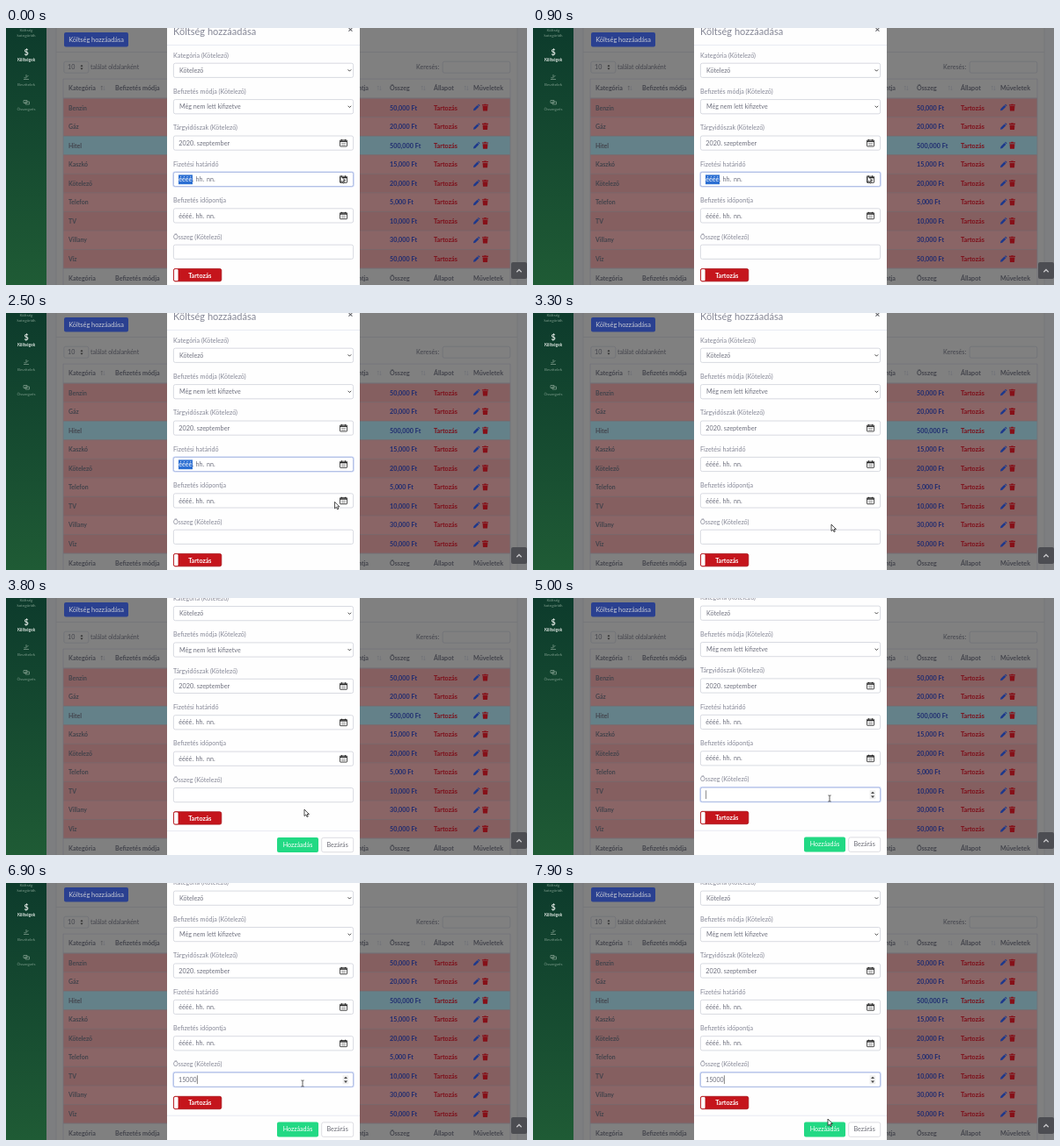
Recreate the animation shown at these times as an HTML page. Size 592 px wide and 293 px high, loop 8000 ms.

```html
<!DOCTYPE html>
<html lang="hu">
<head>
<meta charset="utf-8">
<style>
html, body { margin: 0; width: 100%; height: 100%; overflow: hidden; background: #7d7e80; }
svg { display: block; width: 592px; height: 293px; font-family: Lato, "Open Sans", sans-serif; }
text { white-space: pre; }
</style>
</head>
<body>
<svg id="stage" viewBox="0 0 592 293">
  <defs>
    <linearGradient id="side" x2="0" y2="1">
      <stop stop-color="#0d3b2c"/><stop offset="1" stop-color="#1f5b35"/>
    </linearGradient>
  </defs>
  <g id="page"></g>
  <rect x="183" y="-5" width="219" height="303" fill="#fefefe"/>
  <g id="modal"></g>
  <path id="arrow" d="M0 0V7.6L1.8 6L3 8.6L4.3 8L3.1 5.5H5.4Z" fill="#fff" stroke="#222" stroke-width=".8"/>
  <path id="beam" d="M-1.6-3.5H-.4L0-3L.4-3.5H1.6M0-3V3M-1.6 3.5H-.4L0 3L.4 3.5H1.6" fill="none" stroke="#333" stroke-width=".8"/>
</svg>
<script>
const $ = id => document.getElementById(id);
const text = (x, y, s, fill, size = 7.15, extra = '') =>
  `<text x="${x}" y="${y}" fill="${fill}" font-size="${size}" ${extra}>${s}</text>`;
const bold = (x, y, s, fill, size = 7.15) => text(x, y, s, fill, size, 'font-weight="700"');
const mid = (x, y, s, fill, size, weight = 400) =>
  text(x, y, s, fill, size, `text-anchor="middle" font-weight="${weight}"`);
const rect = (x, y, w, h, fill, stroke = 'none', r = 0, extra = '') =>
  `<rect x="${x}" y="${y}" width="${w}" height="${h}" fill="${fill}" stroke="${stroke}" stroke-width=".8" rx="${r}" ${extra}/>`;
const line = (d, stroke, w = 0.8) => `<path d="${d}" fill="none" stroke="${stroke}" stroke-width="${w}"/>`;

function drawPage() {
  const ink = '#42434b', edge = '#707178', dim = '#7b9a8a', lit = '#dde5e0';
  let s = rect(57, -5, 524, 305, '#808080', '#747579') + line('M57 27.5H581', '#747579');

  s += rect(0, 0, 46, 293, 'url(#side)');
  s += mid(23, 4, 'Költség', dim, 4.6) + mid(23, 10, 'kategóriák', dim, 4.6);
  s += mid(23, 31, '$', lit, 9, 700) + mid(23, 38.2, 'Költségek', lit, 4.6, 700);
  s += line('M20 58.5H26M20.5 56.5L22.5 57L25.5 54M23 53V56', dim) + mid(23, 66, 'Bevételek', dim, 4.6);
  s += line('M20 82.5H24V85.5H20ZM22 84H26.5V87H22Z', dim) + mid(23, 93.5, 'Összegzés', dim, 4.6);

  s += rect(66, 5, 73, 16.5, '#2a4090', 'none', 2) + mid(102.5, 15.7, 'Költség hozzáadása', '#c9cbd3', 7.35);
  s += rect(65.8, 38.2, 28, 13, '#808080', edge, 2) + text(70, 47.4, '10', ink);
  s += '<path d="M84.5 44L86 41.8L87.5 44ZM84.5 45.6L86 47.8L87.5 45.6Z" fill="#333"/>';
  s += text(96, 47, 'találat oldalanként', ink, 6.9) + text(466, 47, 'Keresés:', ink);
  s += rect(496.2, 38.2, 76.6, 13, '#808080', edge, 2);

  const heads = [[71, 'Kategória'], [124, 'Befizetés módja'], [436, 'Összeg'], [486, 'Állapot'], [531, 'Műveletek']];
  for (const y of [71.3, 287.8]) {
    for (const [x, name] of heads) s += bold(x, y, name, ink);
    s += text(412, y, 'Befizetés időpontja', ink, 7.15, 'font-weight="700" text-anchor="end"');
  }
  for (const x of [110, 424, 474, 523])
    s += line(`M${x - 1.2} 71V66M${x - 2.2} 67.2L${x - 1.2} 66L${x - .2} 67.2`, x < 200 ? '#55565c' : '#707177', .6)
       + line(`M${x + 1.5} 66V71M${x + .5} 69.8L${x + 1.5} 71L${x + 2.5} 69.8`, '#707177', .6);

  const rows = [['Benzin', 50], ['Gáz', 20], ['Hitel', 500], ['Kaszkó', 15], ['Kötelező', 20],
    ['Telefon', 5], ['TV', 10], ['Villany', 30], ['Víz', 50]];
  rows.forEach(([name, sum], i) => {
    const top = 80 + i * 21.57, y = top + 13.5;
    s += rect(65, top, 508, 21.57, i == 2 ? '#648189' : i % 2 ? '#8a6566' : '#855f60');
    s += line(`M65 ${top}H573`, '#75656a', .6);
    s += bold(71, y, name, ink, 6.9) + bold(436, y, sum + ',000 Ft', '#1f2c70', 7.25) + bold(486, y, 'Tartozás', '#7d0d18', 7.25);
    s += `<g transform="translate(531 ${top + 7})"><path d="M0 7.3L.5 5L4.6.9L6.4 2.7L2.3 6.8ZM5.1.4L6 -.3L7.6 1.3L6.9 2.2Z" fill="#1d388c"/>
      <path d="M10 .3H12L12.5-.3H14.5L15 .3H17V1.4H10ZM10.6 2H16.4L16 7.5H11Z" fill="#861018"/></g>`;
  });
  s += line('M65 58H573M65 80H573M65 274.1H573M65 58V293M573 58V293', '#727379');
  s += rect(574, 267, 18, 19, '#4c4d52', 'none', 2) + line('M580.3 278.2L583 275.5L585.7 278.2', '#c8c8ca', 1.3);
  $('page').innerHTML = s;
}

const INK = '#6e707e', LABEL = '#858796', STEP = 41.4;
const fieldTop = i => 40.2 + i * STEP;

function field(i, label, focus) {
  const y = fieldTop(i);
  return text(190, y - 6.7, label, LABEL)
    + (focus ? rect(189.3, y - 1, 206.4, 18.2, '#cfd9f7', 'none', 2.4) : '')
    + rect(190.4, y, 204.2, 16.2, '#fff', focus ? '#9fb0de' : '#cfd1da', 2);
}

function choice(i, label, value) {
  const y = fieldTop(i);
  return field(i, label) + text(197, y + 10.7, value, INK)
    + line(`M388.6 ${y + 7.2}L390.4 ${y + 9}L392.2 ${y + 7.2}`, '#444', 1);
}

function calendar(i) {
  const y = fieldTop(i) + 4;
  return `<g transform="translate(379.5 ${y})">` + rect(0, .8, 8, 7.2, '#fff', '#222', .5)
    + line('M0 2.2H8', '#222', 1.4) + line('M2 0V1.5M6 0V1.5', '#222', 1)
    + line('M1.5 4.5H6.5M1.5 6.3H6.5', '#777', .7) + '</g>';
}

function date(i, label, focus) {
  const y = fieldTop(i) + 10.7;
  return field(i, label, focus) + (focus ? rect(196, y - 7.7, 16, 10.8, '#2c6fd3') : '')
    + text(196.3, y, 'éééé', focus ? '#fff' : INK) + text(211.8, y, '.', INK)
    + text(215.5, y, 'hh.', INK) + text(228, y, 'nn.', INK) + calendar(i);
}

const typed = [5800, 6100, 6400, 6600, 6850];
const CLICK = 4700;

function amount(t) {
  const focus = t >= CLICK, n = typed.filter(k => t >= k).length;
  const y = fieldTop(5), last = n ? typed[n - 1] : CLICK, x = 196.6 + n * 4.16;
  let s = field(5, 'Összeg (Kötelező)', focus) + text(196, y + 10.7, '15000'.slice(0, n), INK);
  if (focus) {
    s += rect(382.6, y + 3.2, 6.6, 10, '#eee')
      + `<path d="M384 ${y + 7}L386 ${y + 4.6}L388 ${y + 7}ZM384 ${y + 9.4}L386 ${y + 11.8}L388 ${y + 9.4}Z" fill="#444"/>`;
    if ((t - last) % 1000 < 500) s += line(`M${x} ${y + 3.2}V${y + 13}`, '#555', .7);
  }
  return s;
}

function drawModal(t) {
  let s = text(190, 7.6, 'Költség hozzáadása', LABEL, 11.05) + mid(391.5, 5, '×', '#55565c', 10, 700);
  s += line('M183 19.5H402', '#e3e6f0');
  s += choice(0, 'Kategória (Kötelező)', 'Kötelező');
  s += choice(1, 'Befizetés módja (Kötelező)', 'Még nem lett kifizetve');
  s += field(2, 'Tárgyidőszak (Kötelező)') + text(196.3, fieldTop(2) + 10.7, '2020. szeptember', INK, 7.3) + calendar(2);
  s += date(3, 'Fizetési határidő', t < 3000) + date(4, 'Befizetés időpontja') + amount(t);
  s += rect(190.4, 274.4, 54.4, 14.4, '#c5151c', '#a81218', 2) + rect(190.6, 274.6, 5.4, 14, '#fff', '#b5151b', 1.5);
  s += mid(220.3, 284.6, 'Tartozás', '#fff', 7.1, 700);
  s += line('M183 296.3H402', '#e3e6f0');
  s += rect(308, 303.6, 47, 17, '#22d984', 'none', 2) + mid(331.5, 314.6, 'Hozzáadás', '#fff', 7.15);
  s += rect(358.7, 304, 36, 16.4, '#fff', '#d3d4da', 2) + mid(376.6, 314.6, 'Bezárás', '#6a6b75', 7.15);
  $('modal').innerHTML = s;
}

const ease = (t, a, b) => {
  const p = Math.min(1, Math.max(0, (t - a) / (b - a)));
  return p * p * (3 - 2 * p);
};

// start, end, dx, dy of each pointer move
const moves = [[900, 1500, 0, 42], [2300, 3100, -41, 30.5], [4000, 4500, -2, -12.5], [7200, 7800, -2, 40.5]];

function frame(now) {
  const t = now % 8000;
  let x = 380, y = 168.5;
  for (const [a, b, dx, dy] of moves) {
    const p = ease(t, a, b);
    x += dx * p;
    y += dy * p;
  }
  drawModal(t);
  $('modal').setAttribute('transform', `translate(0 ${-31.1 * ease(t, 3540, 3820)})`);
  const inField = t > 4000 && y > 215 && y < 233;
  for (const id of ['arrow', 'beam']) {
    $(id).setAttribute('transform', `translate(${x} ${y})`);
    $(id).style.display = (id == 'beam') == inField ? '' : 'none';
  }
  requestAnimationFrame(frame);
}

drawPage();
requestAnimationFrame(frame);
</script>
</body>
</html>
```
